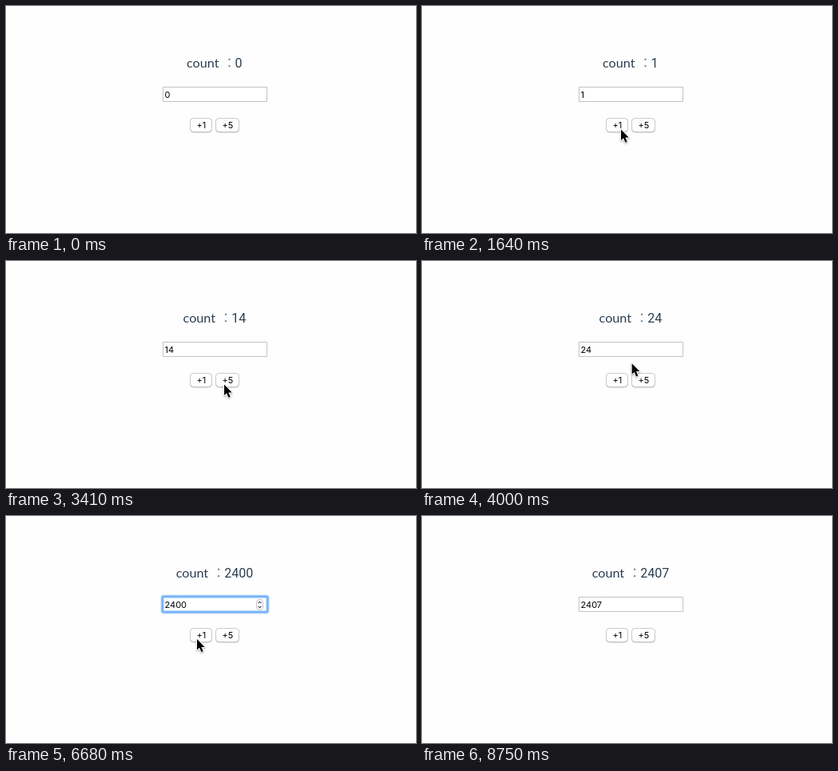
Write an HTML page with a canvas that moves like this. It is 513x284 px and loops after 9.09 s.

```html
<!DOCTYPE html>
<html lang="en">
<head>
<meta charset="utf-8">
<title>Counter</title>
<style>
  html, body { margin: 0; width: 100%; height: 100%; overflow: hidden; background: #fefefe; }
  canvas { display: block; width: 513px; height: 284px; }
</style>
</head>
<body>
<canvas id="stage"></canvas>
<script>
const W = 513, H = 284, LOOP = 9090;
const START = 590, TICK = 148.15; // the screen refreshes in coarse ticks
const canvas = document.getElementById('stage');
const ctx = canvas.getContext('2d');
const ratio = window.devicePixelRatio || 1;
canvas.width = Math.round(W * ratio);
canvas.height = Math.round(H * ratio);

// Ticks at which each input takes effect, in order.
const actions = [
  { label: '+1', ticks: [7, 9, 10, 14], apply: n => n + 1 },
  { label: '+5', ticks: [17, 19, 20, 21], apply: n => n + 5 },
  { label: 'key 0', ticks: [33, 34], apply: n => n * 10 },
  { label: '+1', ticks: [43, 45], apply: n => n + 1 },
  { label: '+5', ticks: [49], apply: n => n + 5 }
];

const onPlusOne = [249, 154.5], onPlusFive = [273, 154.5];
const onInput = [259, 119], below = [248, 181], backOnOne = [239, 154];
const moves = [
  { from: 0, to: 5, a: [312, 254], b: onPlusOne },
  { from: 13, to: 17, a: onPlusOne, b: onPlusFive },
  { from: 21, to: 24, a: onPlusFive, b: onInput },
  { from: 35, to: 38, a: onInput, b: below },
  { from: 38, to: 41, a: below, b: backOnOne },
  { from: 45, to: 48, a: backOnOne, b: onPlusFive },
  { from: 49, to: 54, a: onPlusFive, b: [441, 270] }
];

const within = (tick, from, to) => tick >= from && tick < to;

function countAt(tick) {
  return actions.reduce((n, { ticks, apply }) =>
    ticks.filter(k => k <= tick).reduce(apply, n), 0);
}

// In a burst of clicks only the last press is seen.
function pressedAt(tick) {
  const hit = actions.find(({ ticks }) => ticks.includes(tick + 1) && !ticks.includes(tick + 2));
  return hit ? hit.label : '';
}

function pointerAt(tick) {
  if (!within(tick, 0, 27) && !within(tick, 35, 55)) return null;
  const { from, to, a, b } = moves.filter(m => m.from <= tick).pop();
  const p = Math.min(1, (tick - from) / (to - from));
  const eased = p * p * (3 - 2 * p);
  return a.map((v, i) => v + (b[i] - v) * eased);
}

function text(str, x, y, font, color, align = 'left') {
  ctx.font = font;
  ctx.fillStyle = color;
  ctx.textAlign = align;
  ctx.fillText(str, x, y);
}

function path(points, close) {
  ctx.beginPath();
  points.forEach(([x, y]) => ctx.lineTo(x, y));
  if (close) ctx.closePath();
}

function stroke(color, width) {
  ctx.strokeStyle = color;
  ctx.lineWidth = width;
  ctx.stroke();
}

function roundBox(x, y, w, h, r) {
  ctx.beginPath();
  ctx.roundRect(x, y, w, h, r);
}

function drawHeading(value) {
  const ink = '#2c3e50';
  const left = 226 - 4.45 * (value.length - 1);
  text('count', left, 77, '16.2px Lato, sans-serif', ink);
  text('：', left + 45.4, 77, '16px "Noto Sans CJK JP", "Noto Sans CJK", sans-serif', '#74808c');
  text(value, left + 60.6, 77, '16px Roboto, sans-serif', ink);
}

function chevron(x, y, dir) {
  path([[x - 2, y + dir], [x, y - dir], [x + 2, y + dir]]);
  stroke('#444', 1.1);
}

function drawInput(value, tick) {
  ctx.fillStyle = '#fff';
  ctx.fillRect(196, 101, 131, 19);
  if (within(tick, 28, 42)) {
    roundBox(195.7, 100.7, 131.6, 19.6, 1.5);
    stroke('rgba(90,165,250,.25)', 5);
    stroke('rgba(90,165,250,.5)', 3);
    stroke('rgba(80,155,240,.6)', 1.4);
  } else {
    ctx.beginPath();
    ctx.rect(196.5, 101.5, 130, 18);
    stroke('#c3c3c3', 1);
  }
  text(value, 198.5, 115, '11px Inter, sans-serif', '#000');
  if (within(tick, 28, 31) || within(tick, 33, 39)) {
    ctx.fillStyle = '#000';
    ctx.fillRect(Math.round(199 + 6.9 * value.length), 105, 1, 12);
  }
  if (within(tick, 27, 42)) {
    roundBox(313.5, 104.5, 8, 13, 3.5);
    ctx.fillStyle = '#fff';
    ctx.fill();
    stroke('#c4c4c4', 1);
    chevron(317.5, 108.2, 1);
    chevron(317.5, 113.8, -1);
  }
}

function drawButton(label, x, w, pressed) {
  roundBox(x + 0.5, 140.8, w - 1, 17.2, 4);
  stroke('#b4b4b4', 1);
  roundBox(x + 0.5, 140.5, w - 1, 16.8, 4);
  ctx.fillStyle = '#fff';
  if (pressed) {
    const blue = ctx.createLinearGradient(0, 140, 0, 158);
    blue.addColorStop(0, '#67aff8');
    blue.addColorStop(1, '#1470ee');
    ctx.fillStyle = blue;
  }
  ctx.fill();
  stroke(pressed ? '#3b86e8' : '#cbcbcb', 1);
  text(label, x + w / 2 + 0.3, 153, '11px Inter, sans-serif', pressed ? '#fff' : '#000', 'center');
}

function drawArrow([x, y]) {
  ctx.save();
  ctx.translate(x, y);
  path([[0, 0], [0, 13.6], [3.1, 10.7], [5.4, 16.2], [7.7, 15.2], [5.4, 9.9], [9.7, 9.9]], true);
  ctx.lineJoin = 'round';
  ctx.shadowColor = 'rgba(0,0,0,.35)';
  ctx.shadowBlur = 2 * ratio;
  ctx.shadowOffsetY = ratio;
  stroke('#fff', 2);
  ctx.shadowColor = 'transparent';
  ctx.fillStyle = '#000';
  ctx.fill();
  ctx.restore();
}

function drawBeam(x, y) {
  ctx.beginPath();
  for (const s of [-1, 1]) {
    ctx.moveTo(x - 3.5, y + 8 * s);
    ctx.quadraticCurveTo(x, y + 8 * s, x, y + 6 * s);
    ctx.quadraticCurveTo(x, y + 8 * s, x + 3.5, y + 8 * s);
  }
  ctx.moveTo(x, y - 7);
  ctx.lineTo(x, y + 7);
  ctx.moveTo(x - 2, y + 3);
  ctx.lineTo(x + 2, y + 3);
  stroke('rgba(255,255,255,.8)', 3);
  stroke('#111', 1.2);
}

function draw(time) {
  const tick = Math.floor((time - START) / TICK);
  const value = String(countAt(tick));
  const pressed = pressedAt(tick);
  const tip = pointerAt(tick);
  ctx.setTransform(ratio, 0, 0, ratio, 0, 0);
  ctx.fillStyle = '#fefefe';
  ctx.fillRect(0, 0, W, H);
  drawHeading(value);
  drawInput(value, tick);
  drawButton('+1', 230, 28, pressed === '+1');
  drawButton('+5', 262, 30, pressed === '+5');
  if (within(tick, 27, 33)) drawBeam(258.5, 113.5);
  if (tip) drawArrow(tip);
}

const begin = performance.now();
function frame() {
  draw((performance.now() - begin) % LOOP);
  requestAnimationFrame(frame);
}
frame();
</script>
</body>
</html>
```
